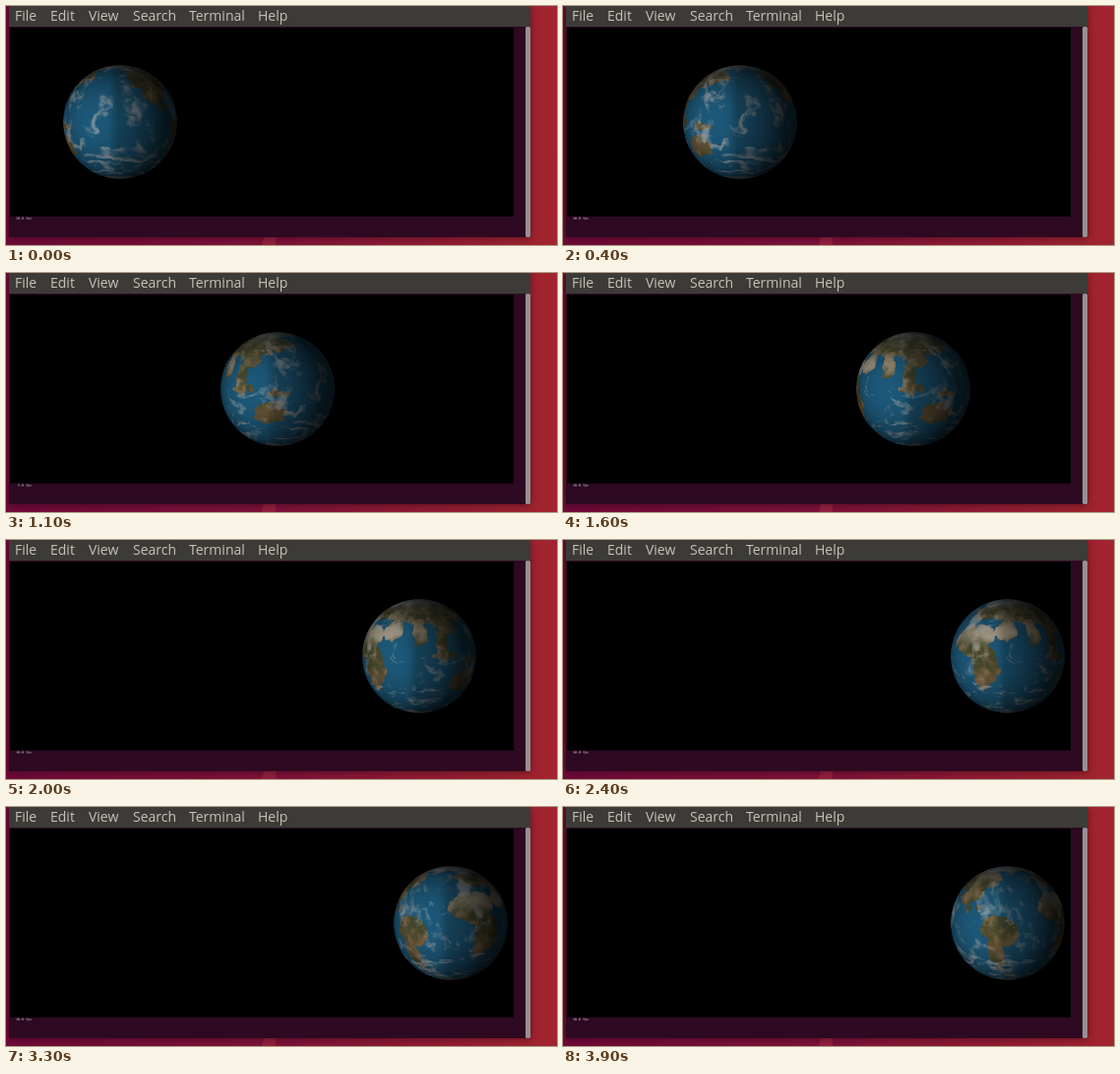
Recreate the animation shown at these times as an HTML page with a canvas. Size 560 px wide and 243 px high, loop 4000 ms.

```html
<!DOCTYPE html>
<html lang="en">
<head>
<meta charset="utf-8">
<title>Terminal globe</title>
<style>
  html, body { margin: 0; width: 100%; height: 100%; overflow: hidden; background: #000; }
  svg { position: absolute; left: 0; top: 0; display: block; }
  #globe { position: absolute; top: 60px; }
  #window { filter: drop-shadow(0 1px 4px rgba(0, 0, 0, .4)); }
  .menu { font: 14px "Open Sans", "Noto Sans", sans-serif; fill: #c6c2b8; }
  #fps { font: 3.33px "DejaVu Sans Mono", monospace; fill: #d8d4d6; white-space: pre; }
</style>
</head>
<body>
<svg width="560" height="243" viewBox="0 0 560 243">
  <defs>
    <linearGradient id="desk">
      <stop offset="0" stop-color="#700a38"/>
      <stop offset=".5" stop-color="#80123a"/>
      <stop offset="1" stop-color="#a3242f"/>
    </linearGradient>
  </defs>
  <rect width="560" height="243" fill="url(#desk)"/>
  <path d="M262 235h12v8h-14z" fill="#96203f"/>
  <rect id="window" x="3" width="530" height="235" fill="#2d0922"/>
  <rect x="3" width="530" height="21" fill="#3c3b37"/>
  <rect x="4" y="22" width="512" height="192"/>
  <rect x="528" y="21" width="5" height="214" rx="1.5" fill="#979093"/>
  <g class="menu">
    <text x="9" y="15">File</text>
    <text x="45" y="15">Edit</text>
    <text x="84" y="15">View</text>
    <text x="129" y="15">Search</text>
    <text x="186" y="15">Terminal</text>
    <text x="256" y="15">Help</text>
  </g>
  <text id="fps" x="10" y="217.3"></text>
</svg>
<canvas id="globe" width="116" height="116"></canvas>
<script>
const SIZE = 116, R = SIZE / 2, RAD = Math.PI / 180;
const W = 360, H = 180;
const globe = document.getElementById('globe');
const fps = document.getElementById('fps');
const ctx = globe.getContext('2d');
const image = ctx.createImageData(SIZE, SIZE);

const clamp = v => Math.max(0, Math.min(1, v));
const mix = (a, b, k) => a + (b - a) * k;
const blend = (a, b, k) => a.map((v, i) => mix(v, b[i], k));
const bell = (v, mid, width) => Math.exp(-(((v - mid) / width) ** 2));

function hash(x, y, z) {
  let h = (Math.imul(x, 374761393) + Math.imul(y, 668265263) + Math.imul(z, 1274126177)) | 0;
  h = Math.imul(h ^ (h >>> 15), 0x85ebca6b);
  h = Math.imul(h ^ (h >>> 13), 0xc2b2ae35);
  return ((h ^ (h >>> 16)) >>> 0) / 4294967296;
}

function noise(x, y, z) {
  const a = Math.floor(x), b = Math.floor(y), c = Math.floor(z);
  const ease = t => t * t * (3 - 2 * t);
  const u = ease(x - a), v = ease(y - b), w = ease(z - c);
  const row = (j, k) => mix(hash(a, j, k), hash(a + 1, j, k), u);
  const slab = k => mix(row(b, k), row(b + 1, k), v);
  return mix(slab(c), slab(c + 1), w);
}

// Layered noise, centred on zero
function fbm(x, y, z) {
  let sum = 0, amp = 0.5;
  for (let o = 0; o < 4; o++, amp /= 2) {
    sum += amp * (noise(x, y, z) - 0.5);
    x = x * 2 + 7; y = y * 2 + 3; z = z * 2 + 11;
  }
  return sum;
}

// Land masses as ovals; noise roughens the coasts
const blob = (lon, lat, rx, ry) => (x, y) =>
  (1 - Math.hypot((x - lon) / rx, (y - lat) / ry)) * Math.min(rx, ry);
const blobs = [
  blob(8, 18, 25, 17), blob(25, -10, 15, 25),                           // Africa
  blob(15, 50, 22, 12), blob(90, 55, 75, 20), blob(50, 27, 13, 12),     // Eurasia
  blob(78, 20, 8, 13), blob(104, 18, 8, 16), blob(110, 32, 14, 12),
  blob(102, -1, 7, 4), blob(114, 1, 5, 5), blob(141, -5, 9, 3),         // islands
  blob(134, -25, 20, 12),                                               // Australia
  blob(-60, -8, 20, 15), blob(-66, -32, 9, 22),                         // South America
  blob(-100, 52, 38, 20), blob(-100, 32, 18, 14), blob(-92, 16, 10, 4), // North America
  blob(-42, 72, 14, 11)                                                 // Greenland
];

const OCEAN = [30, 92, 126], FOREST = [70, 74, 46], SAND = [172, 160, 140];
const EARTH = [124, 96, 62], TUNDRA = [112, 110, 98], ICE = [146, 150, 150], CLOUD = [165, 172, 174];

function surface(lon, lat) {
  const cl = Math.cos(lat * RAD);
  const x = cl * Math.cos(lon * RAD), y = Math.sin(lat * RAD), z = cl * Math.sin(lon * RAD);
  const rough = fbm(x * 7 + 20, y * 7 + 20, z * 7 + 20);
  const swirl = fbm(x * 3 + 60, y * 3 + 60, z * 3 + 60);

  const height = Math.max(...blobs.map(b => b(lon, lat))) + rough * 13;
  let land = blend(FOREST, EARTH, clamp(0.25 + rough * 3));
  land = blend(land, SAND, clamp(1.2 * bell(lat, 25, 12) * bell(lon, 30, 60) + rough));
  land = blend(land, EARTH, bell(lat, -25, 9) * 0.7);
  land = blend(land, TUNDRA, clamp((lat - 42) / 25 + rough * 2));

  let col = blend(OCEAN, land, clamp(height + 0.5));
  col = blend(col, ICE, clamp((Math.abs(lat + 4) - 66 + rough * 25) / 9) * 0.85);
  const south = bell(lat, -50, 14);
  const puff = fbm(x * 4 + 40 + swirl * 3, y * (4 + 5 * south) + 40 - swirl * 4, z * 4 + 40);
  return blend(col, CLOUD, clamp((puff + rough * 0.35 + south * 0.07 - 0.06) * 5) * 0.75);
}

const tex = new Float32Array(W * H * 3);
for (let y = 0; y < H; y++) {
  for (let x = 0; x < W; x++) tex.set(surface(x - 179.5, 89.5 - y), (y * W + x) * 3);
}

function drawGlobe(turn) {
  const out = image.data;
  for (let j = 0; j < SIZE; j++) {
    for (let i = 0; i < SIZE; i++) {
      const x = (i + 0.5 - R) / R, y = (j + 0.5 - R) / R, r = Math.hypot(x, y);
      const o = (j * SIZE + i) * 4;
      out[o + 3] = 255 * clamp((1 - r) * R + 0.5);
      if (r >= 1) continue;
      const z = Math.sqrt(1 - r * r);
      const lon = turn + Math.atan2(x, z) / RAD, lat = Math.asin(-y) / RAD;
      const u = ((Math.floor(lon + 180) % W) + W) % W;
      const v = Math.min(H - 1, Math.floor(90 - lat));
      // Light from the left, with a soft step at the meridian
      const sun = 0.3 + 0.7 * Math.max(0, 0.78 * z - 0.62 * x);
      const light = sun * mix(1, 0.8, clamp((x + 0.2) / 0.16)) * (0.55 + 0.45 * Math.sqrt(z));
      const s = (v * W + u) * 3;
      for (let k = 0; k < 3; k++) out[o + k] = tex[s + k] * light;
    }
  }
  ctx.putImageData(image, 0, 0);
}

// One step per tick, with a skip ahead and three held ticks
const stepAt = k => k + (k === 5) - (k >= 10) - (k >= 34);

let shown = -1;
function render(now) {
  const tick = Math.floor((now % 4000) / 100);
  if (tick === shown) return;
  shown = tick;
  const n = stepAt(tick);
  drawGlobe(215 - 7.2 * n);
  globe.style.left = 58 + 16 * Math.min(n, 21) + 'px';
  fps.textContent = tick === 11 || tick === 35 ? ' 5.0 fps' : '10.0 fps';
}

const start = performance.now();
function loop() {
  render(performance.now() - start);
  requestAnimationFrame(loop);
}
loop();
</script>
</body>
</html>
```
